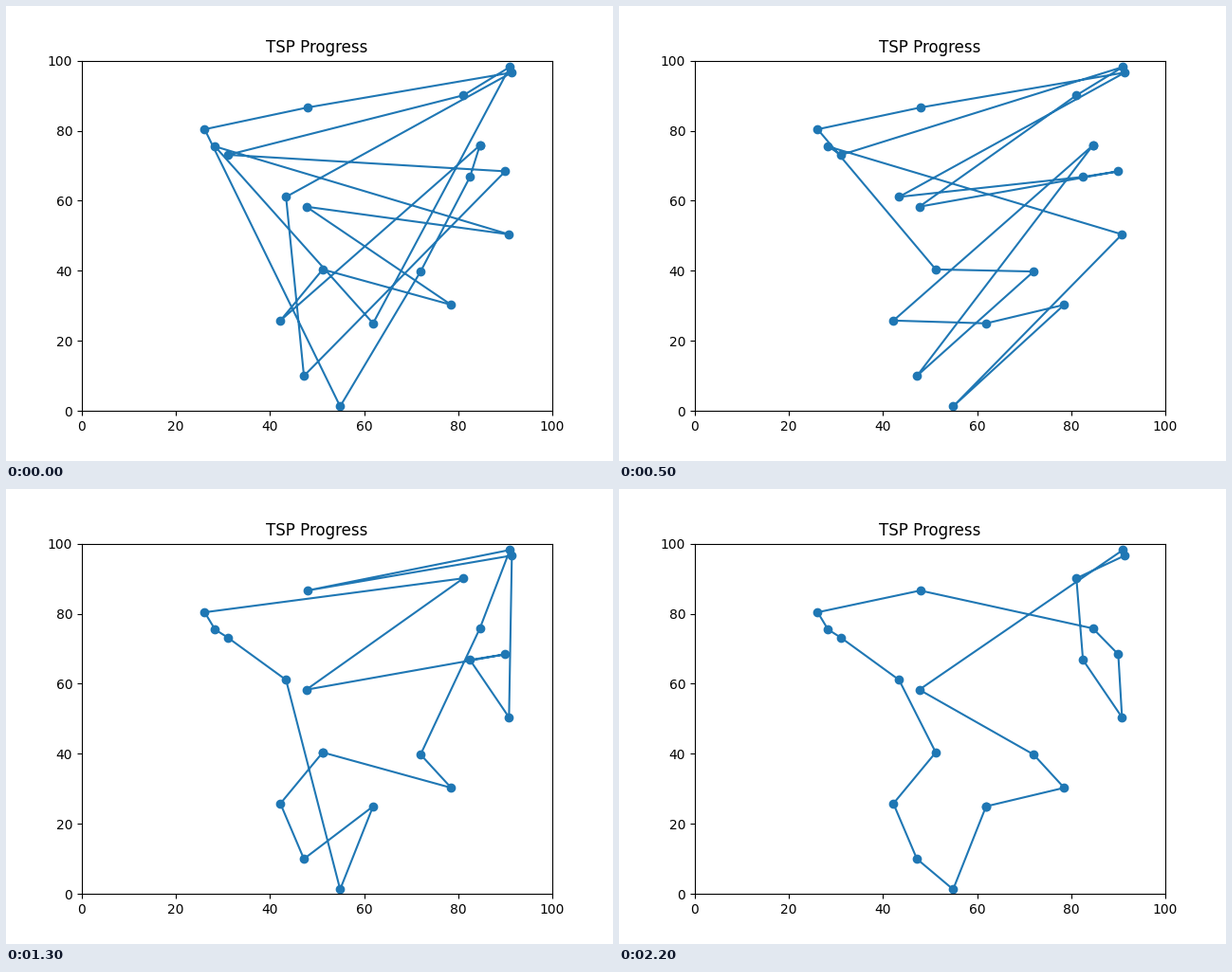
These frames come from a looping animation (640 by 480 pixels, 2.3 s). A matplotlib script:

```python
import matplotlib.pyplot as plt
from matplotlib.animation import FuncAnimation

CITIES = {
    "A": (26.1, 80.4), "B": (28.3, 75.5), "C": (31.1, 73.1), "D": (47.9, 86.6),
    "E": (91.0, 98.2), "F": (91.4, 96.6), "G": (81.1, 90.1), "H": (84.6, 75.8),
    "I": (82.5, 66.8), "J": (90.0, 68.4), "K": (90.8, 50.4), "L": (43.4, 61.1),
    "M": (47.7, 58.3), "N": (51.2, 40.4), "O": (72.0, 39.8), "P": (78.5, 30.3),
    "Q": (61.9, 25.0), "R": (42.2, 25.8), "S": (47.2, 10.0), "T": (54.9, 1.3),
}
START = "HIOTADFLSJCGEQBKMPNR"
# Each step of the search exchanges two cities in the tour
SWAPS = ("CQ MT QN NM SI CB LK LR HN RL QS "
         "PQ EA MG TN HD FH QT DM GH TR KI").split()


def tour_at(step):
    tour = START
    for a, b in SWAPS[:step]:
        tour = tour.translate(str.maketrans(a + b, b + a))
    return tour


fig, ax = plt.subplots(figsize=(6.4, 4.8), dpi=100)
ax.set(xlim=(0, 100), ylim=(0, 100), title="TSP Progress")
line, = ax.plot([], [], "o-", color="tab:blue")


def update(step):
    tour = tour_at(step)
    xs, ys = zip(*(CITIES[c] for c in tour + tour[0]))
    line.set_data(xs, ys)
    return line,


anim = FuncAnimation(fig, update, frames=len(SWAPS) + 1, interval=100,
                     repeat=True, repeat_delay=0)
plt.show()
```
